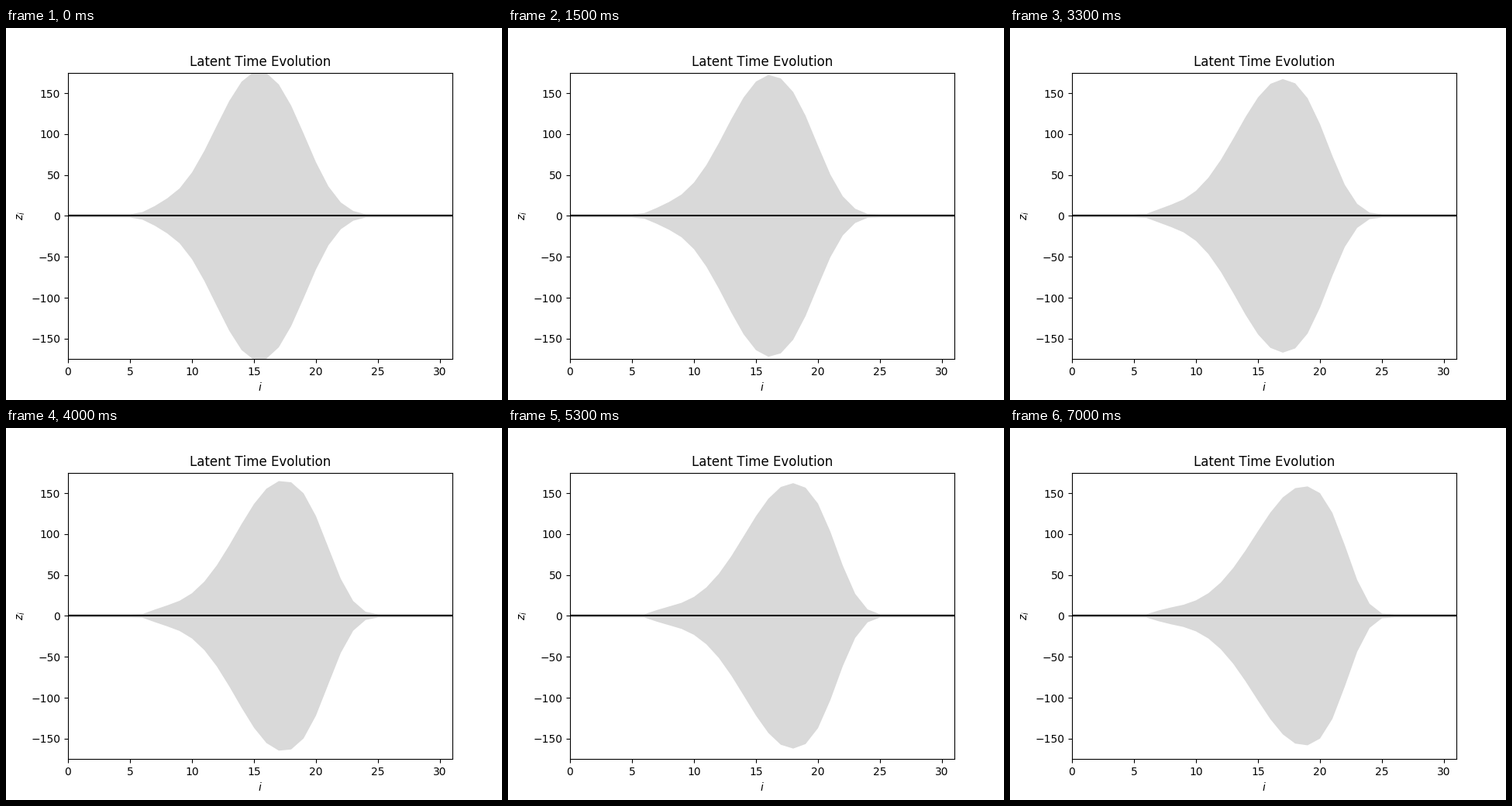
Animation of 640x480 px, one loop 7.1 s. Source, as a matplotlib script:

```python
import numpy as np
import matplotlib.pyplot as plt
from matplotlib.animation import FuncAnimation

FRAMES, INTERVAL = 71, 100
FLOOR = 1.96     # band half-width of an inactive latent

plt.rcParams["text.kerning_factor"] = 6
index = np.arange(32)


def ease(t, start, rate, bend=0):
    return start + rate * t + bend * t**2


def bell(left, right):
    """Gaussian bump from scaled distances on either side of its centre."""
    return np.exp(-np.maximum(left, 0)**2 - np.maximum(right, 0)**2)


def half_width(step):
    t = step / (FRAMES - 1)

    # The main wave drifts right, sinks and steepens at its front.
    d = index - ease(t, 15.34, 3.65, -0.28)
    back = ease(t, 0.206, -0.039, 0.009)
    front = ease(t, 0.173, -0.026) + ease(t, 0.0088, 0.0145, 0.004) * d
    wave = ease(t, 177, -23, 4.5) * bell(-d * back, d * front * (d > 0))

    # A small ripple stays behind and spreads.
    d = index - 7.5
    ripple = ease(t, 3.8, 2.1) * bell(-d / 0.9, d / ease(t, 1.5, 2.3))

    return np.maximum(wave + ripple, FLOOR)


def outline(step):
    width = half_width(step)
    x = np.concatenate([index, index[::-1]])
    y = np.concatenate([width, -width[::-1]])
    return np.column_stack([x, y])


fig, ax = plt.subplots(figsize=(6.4, 4.8), dpi=100)
start = half_width(0)
band = ax.fill_between(index, -start, start, facecolor="0.85", linewidth=0)
ax.plot(index, np.zeros(index.size), color="black", linewidth=1.5)
ax.set(xlim=(0, 31), ylim=(-175, 175), xlabel="$i$", ylabel="$z_i$",
       title="Latent Time Evolution")


def update(step):
    band.set_verts([outline(step)])
    return [band]


anim = FuncAnimation(fig, update, frames=FRAMES, interval=INTERVAL,
                     repeat=True, repeat_delay=0)
plt.show()
```
